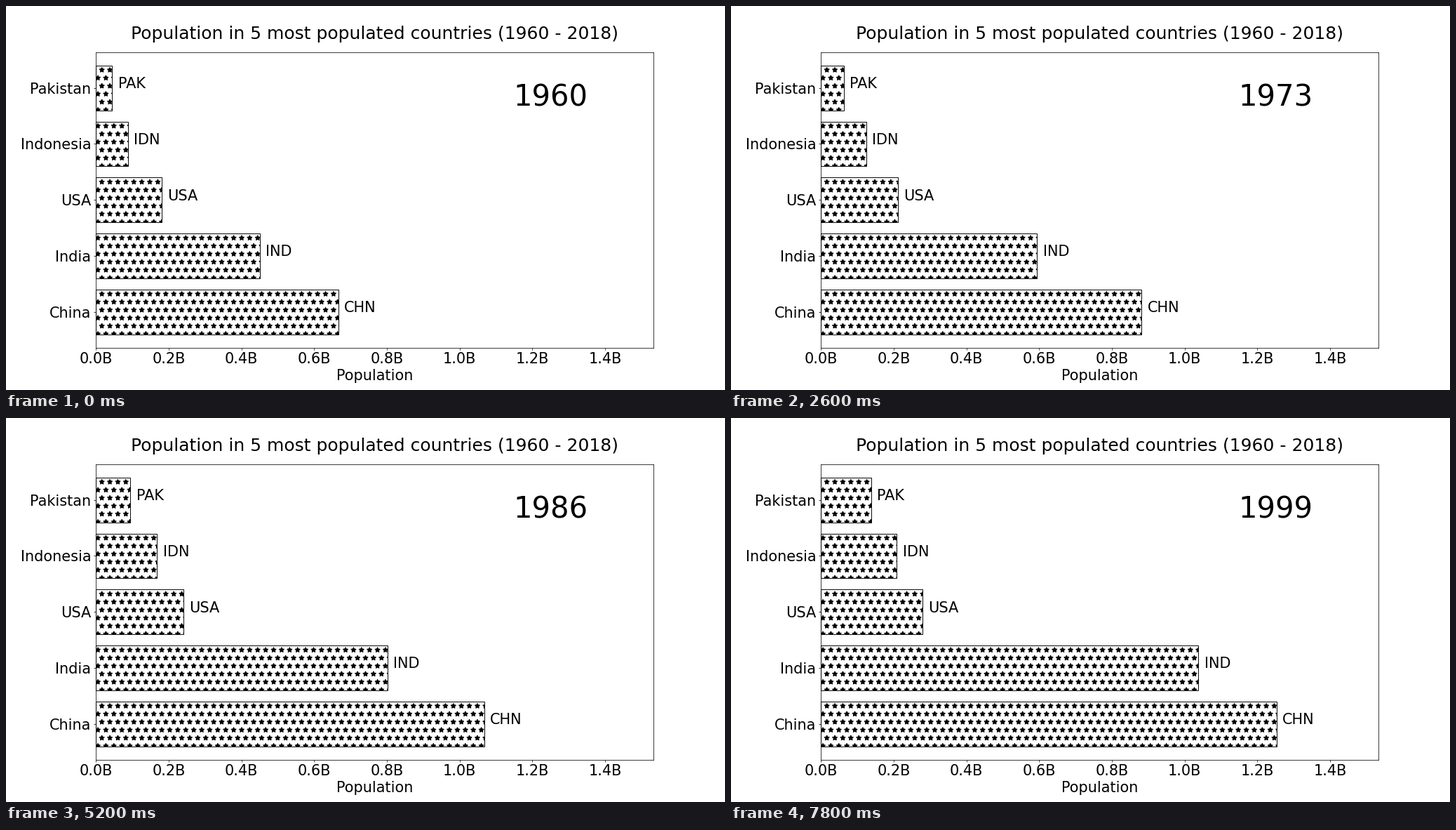
Recreate the animation shown at these times as a matplotlib script. Size 1025x547 px, loop 8000 ms.

```python
import numpy as np
import matplotlib.pyplot as plt
from matplotlib.animation import FuncAnimation
from matplotlib.patches import PathPatch
from matplotlib.path import Path

WIDTH, HEIGHT = 1025, 547
DPI = WIDTH / 15
COLS, ROWS = 90, 48  # star lattice cells across the whole figure
START, YEARS = 1960, 40
LABEL_GAP, LABEL_DROP = 0.016, 0.005

years = np.arange(YEARS)


def smooth(*anchors):
    """Polynomial through evenly spaced anchors, first to last year."""
    at = np.linspace(0, YEARS - 1, len(anchors))
    return np.polyval(np.polyfit(at, anchors, len(anchors) - 1), years)


def broken(*points):
    """Straight segments between (year, value) points."""
    return np.interp(years, *zip(*points))


# Populations in millions
COUNTRIES = [
    ("China", "CHN", broken(
        (0, 667), (1, 660), (2, 666), (5, 715), (10, 818), (13, 882),
        (15, 916), (21, 994), (25, 1051), (30, 1135), (32, 1165),
        (36, 1217.5), (39, 1252.7))),
    ("India", "IND", smooth(450.5, 552.1, 690.9, 859.8, 1038.1)),
    ("USA", "USA", smooth(180.7, 211.9, 240.1, 279.0)),
    ("Indonesia", "IDN", smooth(87.8, 124.2, 168.4, 208.6)),
    ("Pakistan", "PAK", smooth(44.9, 63.2, 95.2, 138.7)),
]


def star_rows(bottom, top):
    """Staggered rows of stars between two heights, in figure fractions."""
    star = Path.unit_regular_star(5)
    points = star.vertices / 3
    first, last = int((1 - top) * ROWS), int((1 - bottom) * ROWS) + 1
    verts = []
    for row in range(first, last + 1):
        for col in np.arange(11, 82) + 0.5 * (row % 2):
            verts.append((points + (col, -row)) / (COLS, ROWS) + (0, 1))
    return Path(np.concatenate(verts), np.tile(star.codes, len(verts)))


plt.rcParams["font.family"] = "DejaVu Sans"
plt.rcParams["font.size"] = 22

fig, ax = plt.subplots(
    figsize=((WIDTH + 0.01) / DPI, (HEIGHT + 0.01) / DPI), dpi=DPI)
fig.subplots_adjust(left=0.125, right=0.9, bottom=0.11, top=0.88)

names, codes, series = zip(*COUNTRIES)
billions = np.array(series) / 1000
places = range(len(names))

bars = ax.barh(places, billions[:, 0], height=0.8, fill=False,
               edgecolor="black", linewidth=1, zorder=2)
ax.set_xlim(0, 1.532)
ax.set_ylim(-0.64, 4.64)
ticks = np.arange(8) * 0.2
ax.set_xticks(ticks, [f"{t:.1f}B" for t in ticks])
ax.set_yticks(places, names)
ax.set_xlabel("Population")
ax.set_title("Population in 5 most populated countries (1960 - 2018)", pad=20)

to_figure = ax.transData + fig.transFigure.inverted()
fills = []
for bar in bars:
    low, high = (to_figure.transform((0, y))[1]
                 for y in (bar.get_y(), bar.get_y() + bar.get_height()))
    fill = PathPatch(star_rows(low, high), facecolor="black",
                     edgecolor="black", linewidth=1, zorder=1,
                     transform=fig.transFigure)
    ax.add_artist(fill)
    fills.append(fill)

labels = [ax.text(0, y - LABEL_DROP, code) for y, code in zip(places, codes)]
year_text = ax.text(0.75, 0.8175, "", fontsize=44, transform=ax.transAxes)


def update(frame):
    for bar, fill, label, value in zip(bars, fills, labels,
                                       billions[:, frame]):
        bar.set_width(value)
        fill.set_clip_path(bar)
        label.set_x(value + LABEL_GAP)
    year_text.set_text(str(START + frame))
    return [*bars, *fills, *labels, year_text]


anim = FuncAnimation(fig, update, frames=YEARS, interval=200,
                     repeat=True, repeat_delay=0, blit=False)
plt.show()
```
